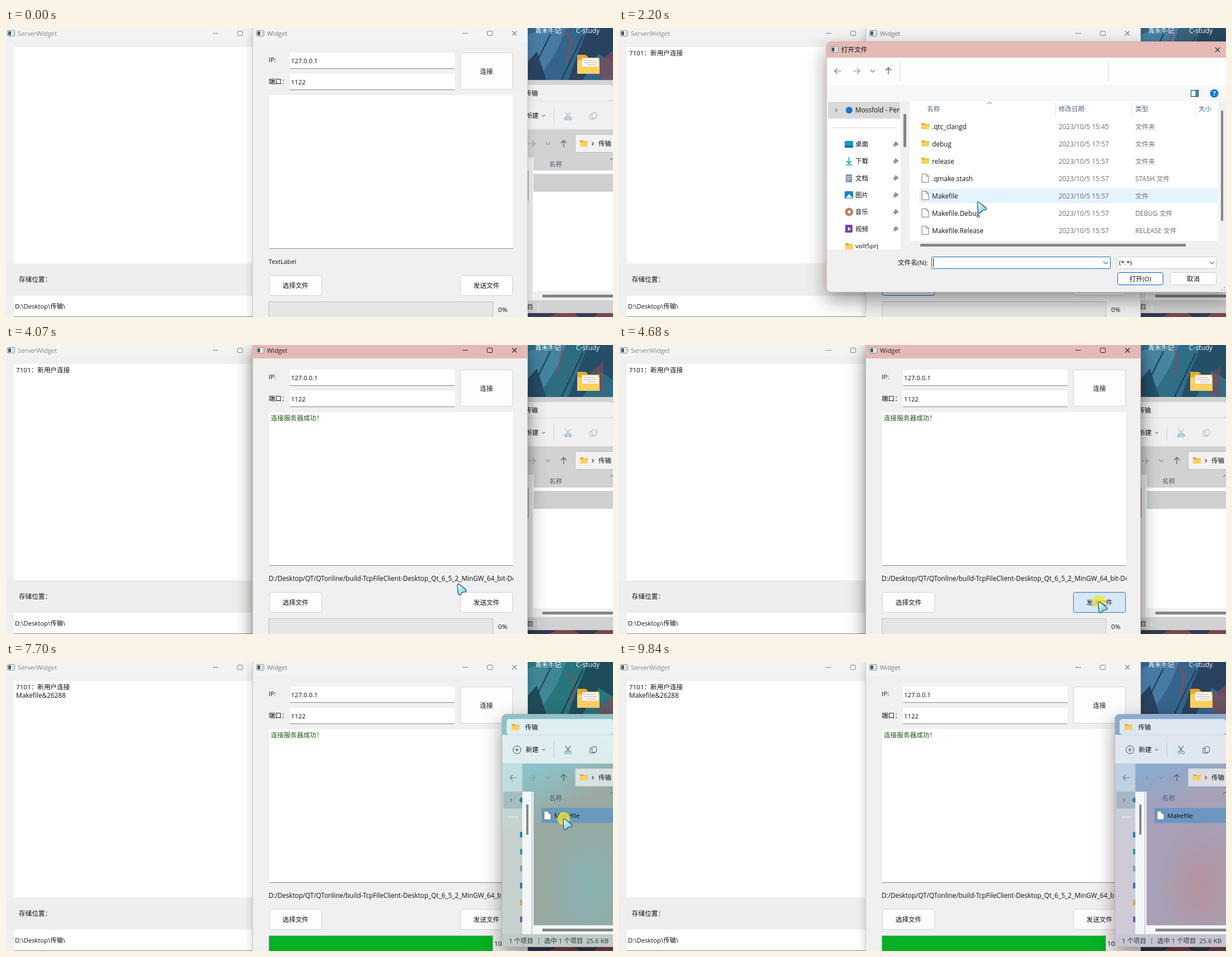
These frames come from a looping animation (1084 by 517 pixels, 9.91 s). An HTML page:

```html
<!DOCTYPE html>
<html lang="zh-CN">
<head>
<meta charset="utf-8">
<title>File transfer demo</title>
<style>
  html, body { margin: 0; width: 100%; height: 100%; overflow: hidden; background: #f0f0f0; }
  svg { display: block; width: 1084px; height: 517px; }
  text { font-family: "Open Sans", "Noto Sans CJK SC", "Noto Sans CJK", sans-serif; white-space: pre; }
  .raised { filter: drop-shadow(0 14px 17px #0006); }
  .resting { filter: drop-shadow(0 5px 8px #0003); }
  .sky, .deep, .warm, .pale, .top, .mid, .low { animation: sky 9910ms linear infinite; }
  .deep { animation-name: deep; }
  .warm { animation-name: warm; }
  .pale { animation-name: pale; }
  .top { animation-name: top; }
  .mid { animation-name: mid; }
  .low { animation-name: low; }
  @keyframes sky {
    0%, 100% { fill: #34648b; } 22% { fill: #3a627b; } 32% { fill: #2d6a78; } 47% { fill: #2f6d88; }
    62% { fill: #207079; } 78% { fill: #28757b; } 90% { fill: #38688e; }
  }
  @keyframes deep { 0%, 100% { fill: #29425f; } 50% { fill: #24506a; } 70% { fill: #1c4f58; } }
  @keyframes pale { 0%, 100% { fill: #477ba4; } 50% { fill: #4586a0; } 70% { fill: #3b8b93; } }
  @keyframes warm {
    0%, 100% { transform: translate(0, 0); opacity: .75; }
    30% { transform: translate(-30px, -25px); opacity: .65; }
    65% { transform: translate(10px, 22px); opacity: .6; }
  }
  @keyframes top { 0%, 65% { stop-color: #8dbfca; } 78% { stop-color: #8bc3cb; } 92%, 100% { stop-color: #88abd0; } }
  @keyframes mid { 0%, 65% { stop-color: #93aaa9; } 78% { stop-color: #99aaa3; } 92%, 100% { stop-color: #a7a0b6; } }
  @keyframes low { 0%, 65% { stop-color: #79b0b5; } 78% { stop-color: #86b2b4; } 92%, 100% { stop-color: #b5929e; } }
</style>
</head>
<body>
<svg id="stage" viewBox="0 0 1084 517"></svg>
<script>
const LOOP = 9910;
const PINK = '#e5b9b5', GREY = '#d2d2d2', BLUE = '#0067c0', LINE = '#868686';
const CLIENT_ACTIVE = '640-1760 3500-6620';

const rect = (x, y, w, h, fill, more = '') =>
  `<rect x="${x}" y="${y}" width="${w}" height="${h}" fill="${fill}" ${more}/>`;
const box = (x, y, w, h, fill, stroke, r = 3) =>
  rect(x + .5, y + .5, w - 1, h - 1, fill, `stroke="${stroke}" rx="${r}"`);
const text = (x, y, s, fill = '#111', size = 11.6, more = '') =>
  `<text x="${x}" y="${y}" fill="${fill}" font-size="${size}" ${more}>${s}</text>`;
const line = (d, stroke = '#666', width = 1, fill = 'none') =>
  `<path d="${d}" stroke="${stroke}" stroke-width="${width}" fill="${fill}"/>`;
const disc = (x, y, r, fill) => `<circle cx="${x}" cy="${y}" r="${r}" fill="${fill}"/>`;
const during = (spans, body) => `<g data-on="${spans}">${body}</g>`;

const button = (x, y, w, h, label, fill = '#fdfdfd', stroke = '#d0d0d0') =>
  box(x, y, w, h, fill, stroke) +
  text(x + w / 2, y + h / 2 + 4.5, label, '#111', 11.6, 'text-anchor="middle"');
const field = (x, y, w, h, value) =>
  rect(x, y, w, h, '#fff') + rect(x, y + h - 1, w, 1, LINE) + text(x + 2, y + h / 2 + 4, value, '#111', 11.3);
const chevron = (x, y, c = '#666', s = 4) => line(`M${x - s} ${y - s / 2}l${s} ${s}l${s} ${-s}`, c, 1.1);
const chevronRight = (x, y, c = '#666') => line(`M${x - 1.5} ${y - 3}l3 3l-3 3`, c, 1.1);
const arrow = (x, y, dir, c = '#666') =>
  `<g transform="translate(${x} ${y}) rotate(${dir})">${line('M-6 0H6M1 -5L6 0L1 5', c, 1.2)}</g>`;
const folder = (x, y, w = 14, h = 11) =>
  line(`M${x} ${y}h${w * .38}l${w * .12} ${h * .15}h${w * .5}v${h * .85}h${-w}z`, 'none', 0, '#e8a92e') +
  rect(x, y + h * .28, w, h * .72, '#fcd063', `rx="${h * .08}"`);
const page = (x, y) => line(`M${x} ${y}h8l4 4v11h-12zM${x + 8} ${y}v4h4`, '#777', 1, '#fdfdfd');
const close = (x, y, c) => line(`M${x - 4} ${y - 4}l8 8m0 -8l-8 8`, c, 1.1);
const appIcon = (x, y) =>
  box(x, y, 14, 11, '#fff', '#7b8288', 1) + rect(x + 2, y + 2, 5, 7, '#3e6068') + rect(x + 9, y + 2, 3, 7, '#ccd5d8');

const titleBar = (x, w, y, h, name, fill, ink) =>
  rect(x, y, w, h, fill) + appIcon(x + 7, 4) + text(x + 26, 14, name, ink, 11.2);
const caption = (x, c) =>
  line(`M${x - 5} 9.5h10`, c) + box(x + 39, 5, 10, 9, 'none', c, 1) + close(x + 88, 9.5, c);

const defs = `<defs>
  <linearGradient id="acrylic" x1="0" y1="0" x2="0.25" y2="1">
    <stop class="top" offset=".1"/><stop class="top" offset=".28"/>
    <stop class="mid" offset=".5"/><stop class="mid" offset="1"/></linearGradient>
  <radialGradient id="glow"><stop class="low" offset="0"/><stop class="low" offset="1" stop-opacity="0"/></radialGradient>
  <linearGradient id="tip" x1="0" y1="0" x2="1" y2="1">
    <stop offset=".1" stop-color="#e2f6ff"/><stop offset=".8" stop-color="#7fd0f4"/></linearGradient>
  <clipPath id="navClip"><rect x="372" y="131" width="130" height="265"/></clipPath>
  <clipPath id="pathClip"><rect x="469" y="405" width="437" height="25"/></clipPath>
  <clipPath id="sideClip"><rect x="886" y="230" width="36" height="257"/></clipPath>
</defs>`;

const desktop = () =>
  rect(900, 0, 184, 517, '#34648b', 'class="sky"') +
  '<path class="pale" d="M932 12L962 0H1000L985 38L950 93H932Z"/>' +
  '<path class="deep" d="M1040 0H1084V62L1058 46L1030 93H1004L1024 38ZM932 60L948 42L965 93H932Z"/>' +
  `<g class="warm">${line('M1046 72L1084 40V93H1066Z', 'none', 0, '#7d4c58')}${line('M996 4L1010 22L1002 62', '#834f5b', 4)}</g>` +
  line('M978 0L950 56M1030 14L992 93', '#1e3b51', 2) +
  rect(932, 509, 152, 8, '#343c52') + line('M970 517l16 -8h28l10 8zM1050 517l8 -8h26v8z', 'none', 0, '#7a4650') +
  text(945, 9, '青禾手记', '#fff') + text(1018, 9, 'C-study', '#fff', 12) +
  folder(1020, 48, 40, 34) + rect(1029, 54, 29, 15, '#f7f7f7') +
  line('M1032 58h20M1032 62h23M1038 66h16', '#a8b0b4') + rect(1020, 70, 40, 12, '#fcd063', 'rx="2"');

const server = () =>
  rect(0, 0, 440, 517, '#f0f0f0') + titleBar(-5, 445, 0, 20, 'ServerWidget', '#f3f3f3', '#858585') +
  caption(374, '#808080') +
  rect(14, 34, 426, 387, '#fff') + rect(0, 421, 440, 58, '#eee') +
  text(23, 454, '存储位置：') + field(14, 479, 426, 38, 'D:\\Desktop\\传输\\') +
  during('720-9910', text(18, 49, '7101：新用户连接')) +
  during('4820-9910', text(18, 64, 'Makefile&amp;26288', '#111', 11.8));

const client = () =>
  during(CLIENT_ACTIVE, rect(440, 0, 492, 560, '#f0f0f0', 'class="raised"')) +
  rect(440, 0, 492, 560, '#f0f0f0', 'class="resting"') +
  titleBar(440, 492, 0, 24, 'Widget', '#f3f3f3', '#777') + caption(820, '#808080') +
  line('M440.5 0V517M931.5 0V517', '#c4c4c4') +
  during(CLIENT_ACTIVE,
    titleBar(440, 492, 0, 24, 'Widget', PINK, '#222') + caption(820, '#222') + line('M440.5 0V517M931.5 0V517', '#d3aaa7')) +
  text(469, 61, 'IP:') + field(507, 44, 294, 29, '127.0.0.1') +
  text(469, 100, '端口：') + field(507, 82, 294, 29, '1122') +
  button(811, 44, 94, 66, '连接') +
  during('440-1020', button(811, 44, 94, 66, '连接', '#e3f0fa', BLUE)) +
  rect(470, 120, 435, 275, '#fff') + rect(470, 394, 435, 1, LINE) +
  during('720-9910', text(473, 135, '连接服务器成功！', '#1c5410')) +
  during('0-3500', text(469, 422, 'TextLabel', '#111', 11.2)) +
  during('3500-9910', `<g clip-path="url(#pathClip)">${text(469, 422,
    'D:/Desktop/QT/QTonline/build-TcpFileClient-Desktop_Qt_6_5_2_MinGW_64_bit-Debug', '#111', 11.7)}</g>`) +
  button(470, 442, 94, 37, '选择文件') +
  during('1300-2300', button(470, 442, 94, 37, '选择文件', '#e3f0fa', BLUE)) +
  button(811, 442, 94, 37, '发送文件') +
  during('4150-5180', button(811, 442, 94, 37, '发送文件', '#d6e8f6', '#2a7abf')) +
  box(469, 489, 401, 32, '#e6e6e6', '#bcbcbc', 0) +
  during('0-4820', text(879, 508, '0%')) +
  during('4820-9910', rect(470, 490, 399, 27, '#06b025') + text(872, 508, '100%'));

const explorer = front => {
  const panel = front ? '#ffffffb8' : '#f0f0f0';
  const icon = front ? '#33566c' : '#9cb0bd';
  const bar = front ? '#f2f6f7' : '#efefef';
  const fileRow = page(961, 267) + text(979, 279, 'Makefile');
  const back = front
    ? rect(885.5, 93.5, 220, 416, 'url(#acrylic)', 'rx="8" stroke="#c7a9aa"') +
      `<ellipse cx="1040" cy="400" rx="75" ry="115" fill="url(#glow)"/>` +
      rect(886, 182, 36, 305, '#ffffff70') + rect(886, 487, 198, 22, '#ffffff60')
    : rect(885, 93, 220, 417, GREY, 'rx="8"');
  const nav = rect(888, 232, 34, 30, '#6f848655') + chevronRight(902, 247) + disc(922, 247, 5, '#1479c9') +
    rect(897, 277, 18, 1, '#fff') +
    ['#1686bb', '#1a9cae', '#8296c0', '#2179bd', '#d9a14a', '#6657b5', '#f0be4a']
      .map((c, i) => rect(918, 304 + i * 30.3, 6, 10, c)).join('');
  const list = front
    ? during('7230-7620', rect(956, 261, 128, 27, '#ffffff50')) +
      during('7620-9910', rect(956, 261, 128, 27, '#4f92c7a8')) + fileRow
    : during('0-4880', rect(942, 255, 142, 216, '#fff') + rect(942, 261, 142, 32, '#cfcfcf')) +
      during('4880-9910', fileRow);
  return `<g class="${front ? 'raised' : ''}">` + back +
    rect(894, 102, 190, 28, panel, 'rx="5"') + rect(886, 130, 198, 52, panel) +
    line('M886 130.5H1084M886 181.5H1084', '#00000014') +
    folder(903, 111) + text(927, 121, '传输') +
    line('M905.5 157a7 7 0 1 0 14 0a7 7 0 1 0 -14 0M909 157h7M912.5 153.5v7', '#444') +
    text(928, 161, '新建') + chevron(960, 157, '#777', 2.5) + line('M978.5 143V171', '#0002') +
    line('M999 150l7 10M1008 150l-7 10', icon, 1.2) +
    line('M998 162a2.3 2.3 0 1 0 4.6 0a2.3 2.3 0 1 0 -4.6 0M1005 162a2.3 2.3 0 1 0 4.6 0a2.3 2.3 0 1 0 -4.6 0', '#609bc0', 1.2) +
    box(1046, 151, 9, 11, 'none', icon, 2) + line('M1046 154h-3v9h8v-2', icon) +
    arrow(906, 207, 180, '#777') + arrow(939, 207, 0, '#999') + chevron(968, 207, '#888') + arrow(996, 207, -90, '#555') +
    box(1016, 190, 80, 33, front ? '#ffffffa0' : '#f2f2f2', '#b9bdbf', 0) +
    folder(1025, 201) + chevronRight(1048, 207, '#333') + text(1058, 211, '传输') +
    (front ? `<g clip-path="url(#sideClip)">${nav}</g>` : '') +
    rect(922, 232, 17, 255, bar) + rect(929, 255, 4, 54, '#888') + rect(940, 232, 2, 255, '#fff') +
    text(970, 248, '名称', '#4c607a') + line('M1079 236l3 -3l3 3', '#555') + list +
    rect(942, 471, 142, 16, bar) + rect(958, 477, 126, 5, '#858585') +
    text(898, 503, '1 个项目', '#20343a', 11.4) + line('M951.5 493V504', front ? '#567' : '#f2f2f2') +
    (front ? during('7620-9910', text(961, 503, '选中 1 个项目  25.6 KB', '#20343a', 11.4)) : '') + '</g>';
};

const dialog = () => {
  const files = [['.qtc_clangd', '15:45'], ['debug', '17:57'], ['release', '15:57'], ['.qmake.stash', '15:57', 'STASH '],
    ['Makefile', '15:57', ''], ['Makefile.Debug', '15:57', 'DEBUG '], ['Makefile.Release', '15:57', 'RELEASE ']];
  const rows = files.map(([name, time, kind], i) => {
    const y = 176 + i * 31.05;
    return (kind === undefined ? folder(540, y - 6) : page(541, y - 8)) +
      text(559, y + 5, name, '#111', 11.8) + text(785, y + 5, `2023/10/5 ${time}`, '#6d6d6d', 11.9) +
      text(922, y + 5, kind === undefined ? '文件夹' : kind + '文件', '#6d6d6d', 11.8);
  }).join('');
  const icons = [
    rect(403, 202, 15, 12, '#1597cf', 'rx="1"') + rect(403, 211, 15, 3, '#0b628f'),
    line('M410.5 231v11M406 238l4.5 4.5l4.5 -4.5M405 245h11', '#1698a4', 1.6),
    rect(405, 262, 11, 14, '#7d93b3', 'rx="1"') + line('M407 266h7M407 269h7M407 272h5', '#fff'),
    rect(403, 292, 15, 13, '#1c80cf', 'rx="1"') + line('M405 304l6 -7l6 7z', 'none', 0, '#fff'),
    disc(411, 329, 7.5, '#b98562') + disc(411, 329, 2.5, '#fff'),
    rect(404, 352, 13, 14, '#7347a8', 'rx="1"') + line('M409 356l5 3.5l-5 3.5z', 'none', 0, '#fff'),
    folder(404, 385)];
  const places = ['桌面', '下载', '文档', '图片', '音乐', '视频', 'volt5prj'].map((name, i) => {
    const y = 208 + i * 30.3;
    return icons[i] + text(422, y + 4, name) +
      (i < 6 ? line(`M494 ${y - 5}l5 5l-3 1l-2 3l-4 -4l3 -2zM492 ${y + 2}l-3 3`, '#777', 1, '#999') : '');
  }).join('');
  const loaded = box(501, 60, 374, 35, '#fff', '#d6d6d6', 0) + folder(510, 71) +
    text(530, 80, '«', '#555') + text(543, 81, 'QTo...') + chevronRight(586, 77, '#333') +
    text(595, 81, 'build-TcpFileClient-Deskto...', '#111', 11.8) + chevronRight(761, 77, '#333') + chevron(820, 78) +
    line('M860.5 75a5 5 0 1 0 .5 3M861 72v4h-4', '#666', 1.1) +
    box(884, 60, 192, 35, '#fff', '#d6d6d6', 0) + text(891, 81, '在 build-TcpFileClient-De...', '#666', 11.6) +
    line('M1053.5 75a3 3 0 1 0 6 0a3 3 0 1 0 -6 0M1054 78l-4 4', '#444', 1.2) +
    text(387, 121, '组织', '#33475b') + line('M414 115h6l-3 3.5z', 'none', 0, '#333') + text(447, 121, '新建文件夹', '#33475b') +
    line('M971 112.5h11M971 115.5h11M971 118.5h11M971 121.5h11', '#444') + line('M993 115h6l-3 3.5z', 'none', 0, '#333');
  const heads = [[550, '名称'], [785, '修改日期'], [922, '类型'], [1035, '大小']];

  return `<g class="raised">` +
    rect(370.5, 24.5, 730, 448, '#f0f0f0', `rx="8" stroke="#d9aaa6"`) +
    line('M371 53V33Q371 25 379 25H1084V53Z', 'none', 0, PINK) +
    appIcon(378, 33) + text(397, 43, '打开文件') + close(1069, 39, '#222') +
    rect(371, 53, 713, 49, '#fdfdfd') + rect(371, 102, 713, 29, '#f5f7f9') + rect(371, 131, 713, 265, '#fff') +
    arrow(391, 77, 180, '#777') + arrow(424, 77, 0, '#888') + chevron(453, 77, '#777') + arrow(481, 77, -90, '#444') +
    line('M501.5 60V95M874.5 60V95', '#d6d6d6') + during('2300-3500', loaded) +
    box(1021, 111, 14, 12, '#fff', '#222', 0) + rect(1029, 112, 5, 10, '#2b9ae0') +
    disc(1063, 117, 7.5, '#0f78d4') + text(1063, 121, '?', '#fff', 11, 'text-anchor="middle" font-weight="700"') +
    `<g clip-path="url(#navClip)">` +
    rect(373, 132, 130, 30, '#d9d9d9') + chevronRight(388, 147) + disc(411, 147, 6, '#1479c9') +
    text(422, 151, 'Mossfold - Personal', '#111', 11.8) + rect(380, 178, 115, 1, '#d0d0d0') + places + '</g>' +
    rect(503, 131, 16, 265, '#f0f0f0') + rect(508, 154, 5, 59, '#858585') +
    heads.map(([x, s]) => text(x, 148.5, s, '#54657a')).join('') +
    line('M779.5 132V156M915.5 132V156M1029.5 132V156', '#e2e2e2') + line('M658 136l4 -3.5l4 3.5', '#666') +
    rect(536, 287, 533, 26, '#e5f3ff') + rows +
    rect(1070, 131, 14, 265, '#f0f0f0') + rect(1075, 148, 4, 197, '#858585') +
    rect(519, 381, 565, 15, '#f0f0f0') + rect(538, 386, 474, 5, '#858585') +
    text(498, 424, '文件名(N):') + box(558, 409, 320, 22, '#fff', '#0f6fbe', 1) + chevron(869, 420) +
    during('1800-2330 2860-3180', rect(561, 412, 1, 15, '#111')) + during('3280-3500', text(562, 424, 'Makefile')) +
    box(889, 409, 178, 22, '#fdfdfd', '#ccc', 2) + text(893, 424, '(*.*)') + chevron(1059, 420) +
    button(890, 437, 82, 23, '打开(O)', '#fdfdfd', BLUE) + button(984, 437, 83, 23, '取消') +
    [[0, 0], [4, 0], [4, -4]].map(([x, y]) => rect(1076 + x, 467 + y, 2, 2, '#aaa')).join('') + '</g>';
};

const pointer = `<g id="pointer">` +
  during('600-740 1500-1640 3260-3340 3400-3480 4600-4780 6560-6680 7620-7800',
    '<circle cx="1" cy="0" r="11.5" fill="#f0e83a" opacity=".8"/>') +
  '<path d="M3 1Q0 -1 0 3L1 17Q2 22 6 19L9 15.5L13.5 15Q18 13 14 9.5Z" fill="url(#tip)" stroke="#24404f" stroke-width="1.2"/></g>';

document.getElementById('stage').innerHTML = defs + desktop() + explorer(false) + server() + client() +
  during('6620-9910', explorer(true)) + during('1760-3500', dialog()) + pointer;

const stops = [[0, 1000, 535], [150, 1000, 530], [480, 862, 84], [950, 862, 84], [1350, 532, 462], [1700, 532, 462],
  [2150, 640, 311], [2700, 640, 311], [3100, 606, 298], [3500, 606, 298], [4300, 856, 459], [4950, 856, 459],
  [5700, 1014, 318], [6900, 1014, 318], [7400, 995, 280], [8000, 995, 280], [8500, 1100, 300], [LOOP, 1100, 300]];
const timed = [...document.querySelectorAll('[data-on]')].map(node =>
  ({ node, spans: node.dataset.on.split(' ').map(s => s.split('-').map(Number)) }));
const hand = document.getElementById('pointer');
const start = performance.now();

function draw() {
  const t = (performance.now() - start) % LOOP;
  for (const { node, spans } of timed)
    node.style.display = spans.some(([a, b]) => t >= a && t < b) ? '' : 'none';
  const i = stops.findIndex(s => s[0] > t);
  const [t0, x0, y0] = stops[i - 1], [t1, x1, y1] = stops[i];
  const k = (t - t0) / (t1 - t0), e = k * k * (3 - 2 * k);
  hand.setAttribute('transform', `translate(${x0 + (x1 - x0) * e} ${y0 + (y1 - y0) * e})`);
  requestAnimationFrame(draw);
}
draw();
</script>
</body>
</html>
```
